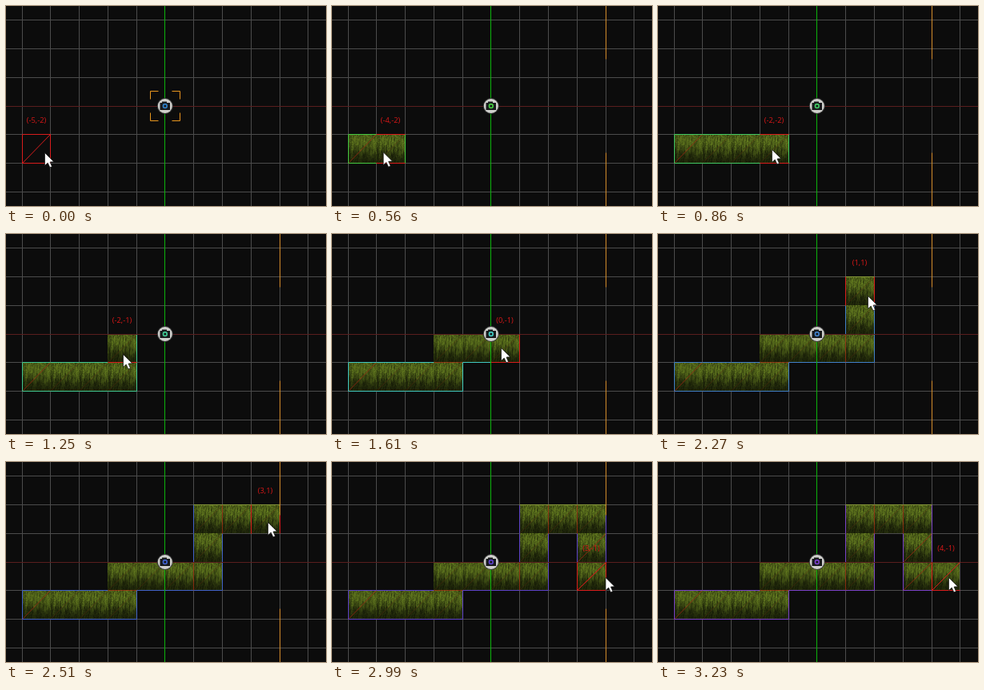
Recreate the animation shown at these times as an HTML page with a canvas. Size 400 px wide and 250 px high, loop 4090 ms.

```html
<!DOCTYPE html>
<html lang="en">
<head>
<meta charset="utf-8">
<title>Tile painting</title>
<style>
html, body { margin: 0; width: 100%; height: 100%; overflow: hidden; background: #0c0c0c; }
canvas { display: block; width: 100vw; height: 100vh; }
</style>
</head>
<body>
<canvas id="stage" width="400" height="250"></canvas>
<script>
const ctx = document.getElementById('stage').getContext('2d');
const LOOP = 4090, START = 500, END = 3230, STEP = 30;
const RED = '#d81c1c', DIM = 'rgba(190,35,20,.6)', FAINT = 'rgba(190,35,20,.14)';
const ORANGE = '#d08a2a';
const gx = k => Math.round(198.45 + 35.77 * k);
const gy = k => Math.round(124.6 - 35.8 * k);

// The stroke: a start cell, then one step per letter
const MOVES = { R: [1, 0], U: [0, 1], D: [0, -1] };
const cells = [[-5, -2]];
for (const m of 'RRRURRRUURRDDR') {
  const [x, y] = cells[cells.length - 1], [dx, dy] = MOVES[m];
  cells.push([x + dx, y + dy]);
}
const LAST = cells.length - 1;

// Pointer keys: time, x, y
const path = [
  [500, 48, 183], [860, 142, 179], [1070, 146, 178], [1250, 146, 150],
  [1580, 197, 143], [1610, 211, 142], [1820, 256, 140], [2000, 260, 114],
  [2270, 262, 77], [2510, 327, 75], [2660, 337, 82], [2990, 341.5, 144],
  [3200, 363, 144]
];

function pointer(t) {
  let i = 0;
  while (i < path.length - 2 && t > path[i + 1][0]) i++;
  const [a, ax, ay] = path[i], [b, bx, by] = path[i + 1];
  const p = Math.max(0, Math.min(1, (t - a) / (b - a)));
  return [ax + (bx - ax) * p, ay + (by - ay) * p];
}

// Last cell of the stroke that the pointer has reached
function reached(t) {
  let n = 0;
  for (let s = START; s <= t && n < LAST; s += STEP) {
    const [x, y] = pointer(s), [cx, cy] = cells[n + 1];
    if (x >= gx(cx) && x < gx(cx + 1) && y >= gy(cy + 1) && y < gy(cy)) n++;
  }
  return n;
}

function makeGrass() {
  const tile = document.createElement('canvas');
  tile.width = tile.height = 36;
  const c = tile.getContext('2d');
  let seed = 17;
  const rnd = () => (seed = seed * 16807 % 2147483647) / 2147483647;
  for (let x = 0; x < 36; x++) {
    const blade = rnd() * 10;
    let tone = rnd();
    for (let y = 0; y < 36; y++) {
      tone = .6 * tone + .4 * rnd();
      const fade = Math.max(0, Math.min(1, (y - 18 + blade) / 16));
      const v = (1 - .6 * fade) * (.45 + 1.05 * tone);
      c.fillStyle = `rgb(${76 * v},${94 * v},${24 * v})`;
      c.fillRect(x, y, 1, 1);
    }
  }
  return tile;
}
const grass = makeGrass();

function line(x1, y1, x2, y2, color) {
  ctx.strokeStyle = color;
  ctx.lineWidth = 1;
  ctx.beginPath();
  ctx.moveTo(x1 + .5, y1 + .5);
  ctx.lineTo(x2 + .5, y2 + .5);
  ctx.stroke();
}
const edge = (a, b, c, d, color) => line(gx(a), gy(b), gx(c), gy(d), color);
const diagonal = ([x, y], color) => edge(x, y, x + 1, y + 1, color);

// Sides of a cell with the step to the neighbour behind each
const sides = ([x, y]) => [
  [-1, 0, x, y, x, y + 1], [1, 0, x + 1, y, x + 1, y + 1],
  [0, -1, x, y, x + 1, y], [0, 1, x, y + 1, x + 1, y + 1]
];

function grid() {
  ctx.fillStyle = '#0c0c0c';
  ctx.fillRect(0, 0, 400, 250);
  for (let k = -5; k <= 5; k++) line(gx(k), -1, gx(k), 251, '#4b4b4b');
  for (let k = -3; k <= 3; k++) line(-1, gy(k), 401, gy(k), '#4b4b4b');
}

// Tiles cover the edges that fall on their own pixels, so only some lines show
function tiles(n, tint) {
  const painted = cells.slice(0, n + 1);
  const has = (x, y) => painted.some(c => c[0] === x && c[1] === y);
  for (const [x, y] of painted)
    ctx.drawImage(grass, gx(x), gy(y + 1), gx(x + 1) - gx(x), gy(y) - gy(y + 1));
  painted.forEach((cell, i) => {
    const [x, y] = cell;
    diagonal(cell, i === 0 || i > 11 ? DIM : FAINT);
    for (const [dx, dy, ...e] of sides(cell)) {
      const open = !has(x + dx, y + dy);
      const shown = dx ? e[0] !== -2 && e[0] < 5 : e[1] < 0;
      if (open && shown) edge(...e, tint);
      if (open && e[1] === 2 && dy) edge(...e, '#87983a');
      const prev = i && cells[i - 1];
      const joint = prev && prev[0] === x + dx && prev[1] === y + dy;
      if (joint && (dx ? e[0] > 0 : e[1] < 0)) edge(...e, DIM);
    }
  });
}

function highlight(n, idle) {
  for (const [dx, , ...e] of sides(cells[n]))
    if (idle || (dx ? e[0] > 0 && e[0] < 5 : e[1] < 0)) edge(...e, RED);
  if (idle || n > 11) diagonal(cells[n], RED);
}

function frame(idle, n) {
  if (idle) {
    for (const [x, dx] of [[180, 10], [217, -10]])
      for (const [y, dy] of [[106, 10], [143, -10]]) {
        line(x, y, x + dx, y, '#e8961e');
        line(x, y, x, y + dy, '#e8961e');
      }
  } else if (n < LAST) {
    line(342, -1, 342, 66, ORANGE);
    line(342, 183, 342, 251, ORANGE);
  }
}

function disc(r, color) {
  ctx.fillStyle = color;
  ctx.beginPath();
  ctx.arc(198.8, 125, r, 0, 7);
  ctx.fill();
}

function camera(lens) {
  disc(10, '#3a3a3a');
  disc(9, '#cfcfcc');
  ctx.fillStyle = '#17191b';
  ctx.fillRect(192.5, 121, 12.5, 9);
  ctx.fillRect(195, 119.5, 6, 2);
  disc(3.2, lens);
  disc(1.5, '#17191b');
}

function label([x, y]) {
  ctx.font = '9.3px "Open Sans", sans-serif';
  ctx.textAlign = 'center';
  ctx.fillStyle = '#dc1818';
  ctx.fillText(`(${x},${y})`, gx(x) + 18, gy(y + 1) - 14.5);
}

const ARROW = new Path2D('M0 0V16L3.7 12.6 6.4 18.3 9 17.2 6.5 11.5 11.3 11.2Z');

function arrow([x, y]) {
  ctx.save();
  ctx.translate(x + .5, y + .5);
  ctx.fillStyle = '#fff';
  ctx.fill(ARROW);
  ctx.strokeStyle = '#111';
  ctx.lineWidth = .7;
  ctx.stroke(ARROW);
  ctx.restore();
}

function draw(time) {
  const idle = time < START;
  const t = idle ? 0 : Math.min(END, START + Math.floor((time - START) / STEP) * STEP);
  const n = idle ? 0 : reached(t);
  const tint = `hsl(${135 + (t - 860) * .055},55%,52%)`;
  grid();
  if (!idle) tiles(n, tint);
  line(-1, gy(0), 401, gy(0), '#5a1e1e');
  highlight(n, idle);
  line(gx(0), -1, gx(0), 251, '#0cb20c');
  frame(idle, n);
  camera(idle ? '#2f7fc4' : tint);
  label(cells[n]);
  arrow(pointer(t));
}

function tick() {
  draw(performance.now() % LOOP);
  requestAnimationFrame(tick);
}
tick();
</script>
</body>
</html>
```
